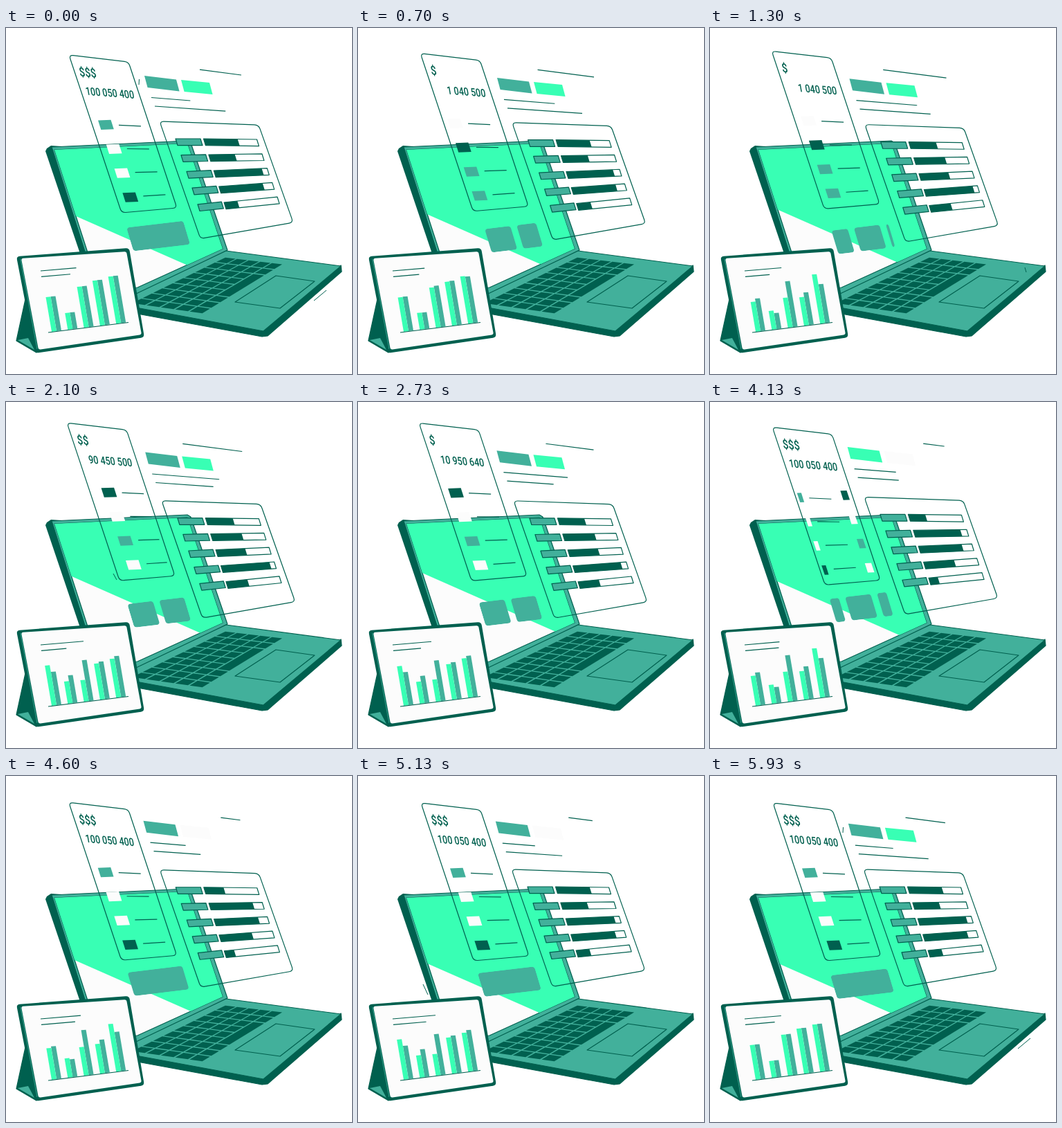
An HTML page that plays this animation: 500 px wide and 500 px high, repeating every 6010 ms.

```html
<!DOCTYPE html>
<html lang="en">
<head>
<meta charset="utf-8">
<title>Laptop dashboard</title>
<style>
  html, body { margin: 0; width: 100%; height: 100%; overflow: hidden; background: #fff; }
  svg { display: block; width: 100vw; height: 100vh; }
  text { font-family: Roboto, "Liberation Sans", sans-serif; font-weight: 500; fill: #00604f; }
</style>
</head>
<body>
<svg id="stage" viewBox="0 0 500 500"></svg>
<script>
const DARK = '#00604f', TEAL = '#42b09b', GREEN = '#38ffb4', WHITE = '#fcfcfc';
const LOOP = 6010;
const stage = document.getElementById('stage');

function set(node, attrs) {
  for (const name in attrs) node.setAttribute(name, attrs[name]);
  return node;
}
function add(parent, tag, attrs = {}) {
  return parent.appendChild(set(document.createElementNS('http://www.w3.org/2000/svg', tag), attrs));
}
const group = (parent, attrs) => add(parent, 'g', attrs);
const poly = (parent, points, fill, attrs = {}) => add(parent, 'polygon', { points, fill, ...attrs });
const line = (parent, x1, y1, x2, y2, width = 1.2) =>
  add(parent, 'line', { x1, y1, x2, y2, stroke: DARK, 'stroke-width': width });
const move = (node, x, y) => node.setAttribute('transform', `translate(${x} ${y})`);
const outline = { stroke: DARK, 'stroke-width': 1.2, 'stroke-linejoin': 'round' };

function setLength(node, length, slope) {
  set(node, { x2: +node.getAttribute('x1') + length, y2: +node.getAttribute('y1') + length * slope });
}

function roundPoly(parent, points, r, attrs) {
  const n = points.length;
  const toward = (a, b) => {
    const k = r / Math.hypot(b[0] - a[0], b[1] - a[1]);
    return [a[0] + (b[0] - a[0]) * k, a[1] + (b[1] - a[1]) * k];
  };
  const d = points.map((p, i) =>
    `${i ? 'L' : 'M'}${toward(p, points[(i + n - 1) % n])}Q${p} ${toward(p, points[(i + 1) % n])}`);
  return add(parent, 'path', { d: d.join('') + 'Z', ...attrs });
}

function clip(id, tag, attrs) {
  add(add(stage, 'clipPath', { id }), tag, attrs);
  return `url(#${id})`;
}

// Timing
const STEP = 600;
const wave = (t, delay = 0, period = LOOP) => Math.sin(2 * Math.PI * (t - delay) / period);
// One rise and fall; skew below 1 brings the peak forward.
const swell = (t, span, skew) => Math.sin(Math.PI * Math.min(1, t / span) ** skew) ** 2;
const progress = (t, start) => Math.min(1, Math.max(0, (t - start) / STEP));
const smooth = x => x * x * (3 - 2 * x);
const backOut = x => 1 + 2.7 * (x - 1) ** 3 + 1.7 * (x - 1) ** 2;
const countPassed = (t, starts) => starts.filter(s => s <= t).length;
// Holds each pose and eases to the next one at every start.
const blend = (t, starts, poses) =>
  starts.reduce((v, s, i) => v + (poses[i + 1] - poses[i]) * smooth(progress(t, s)), poses[0]);

// Laptop
const laptop = group(stage);
poly(laptop, '57,178 59,174 65,170 80,171 150,388 128,388', DARK);
poly(laptop, '66,172 262,163 267,166 320,321 190,386 134,386', TEAL, outline);
const SCREEN = '70,176 262,167 313,319 190,375 136,380';
poly(laptop, SCREEN, WHITE, outline);
const screen = group(laptop, { 'clip-path': clip('screen', 'polygon', { points: SCREEN }) });
const wash = poly(screen, '', GREEN);
poly(laptop, '190,404 372,438 484,343 485,352 378,445 370,446 190,413', DARK, outline);
poly(laptop, '188,384 318,322 484,344 372,438 188,404', TEAL, outline);
poly(laptop, '390,358 446,366 396,405 331,396', 'none', outline);

// Keyboard: u runs along the hinge, v from the hinge to the front.
function keyPoint(u, v) {
  const mix = (a, b, c, d) => (a * (1 - u) + d * u) * (1 - v) + (b * (1 - u) + c * u) * v;
  return [mix(317, 401, 284, 180), mix(331, 341, 413, 398)];
}
const KEY_ROWS = 5, KEY_COLS = 9;
function addKey(col, row, span = 1) {
  const u0 = (col + 0.07) / KEY_COLS, u1 = (col + span - 0.07) / KEY_COLS;
  const v0 = (row + 0.06) / KEY_ROWS, v1 = (row + 0.94) / KEY_ROWS;
  return poly(laptop, [keyPoint(u0, v0), keyPoint(u0, v1), keyPoint(u1, v1), keyPoint(u1, v0)].join(' '), DARK);
}
for (let row = 0; row < KEY_ROWS; row++)
  for (let col = 0; col < KEY_COLS; col++)
    if (row < KEY_ROWS - 1 || col < 2 || col > 5) addKey(col, row);
const spaceBar = addKey(2, KEY_ROWS - 1, 4);

// Header pills, text lines and the tiles on the screen float together.
const header = group(stage);
const pillA = add(header, 'rect', { width: 46, height: 17, transform: 'matrix(1 .12 .27 1 200 69)' });
const pillB = add(header, 'rect', { width: 41, height: 17, transform: 'matrix(1 .1 .27 1 253 75)' });
const titleLine = line(header, 340, 68, 0, 0);
const textA = line(header, 210, 100.5, 0, 0);
const textB = line(header, 215, 113, 0, 0);
const tiles = group(group(header, { transform: 'matrix(1 -.12 .3 1 174 288.5)' }),
  { 'clip-path': clip('tiles', 'rect', { width: 82, height: 34, rx: 4 }) });
const wide = [[0, 82]], pair = [[0, 37], [46, 36]];
const tileSets = [wide, pair, pair, wide].map(spans => {
  const g = group(tiles);
  for (const [x, width] of spans) add(g, 'rect', { x, width, height: 34, rx: 4, fill: TEAL });
  return g;
});
const TILE_STARTS = [300, 1250, 4097];

// Amount card
const amountCard = group(stage);
roundPoly(amountCard, [[91, 39], [177, 49], [247, 260], [167, 267]], 6, { fill: 'none', ...outline });
const dollars = add(amountCard, 'text', { 'font-size': 18, transform: 'matrix(.8 .07 .2 1 107 69.5)' });
const amount = add(amountCard, 'text',
  { 'font-size': 16, 'text-anchor': 'end', transform: 'matrix(.78 .06 .18 1 186 102)' });
const rows = group(amountCard,
  { 'clip-path': clip('rows', 'polygon', { points: '115,100 188,100 249,280 176,280' }) });
const rowSets = [
  [TEAL, WHITE, WHITE, DARK], [WHITE, DARK, TEAL, TEAL],
  [DARK, WHITE, TEAL, WHITE], [TEAL, WHITE, WHITE, DARK]
].map(colors => {
  const g = group(rows);
  colors.forEach((fill, i) => {
    const x = 133 + 11.8 * i, y = 133.5 + 34.9 * i;
    add(g, 'rect', { width: 18.5, height: 13.5, fill, transform: `matrix(1 -.04 .32 1 ${x} ${y})` });
    line(g, x + 30, y + 6.8 - i * 0.7, x + 62, y + 8.3 - i * 1.9);
  });
  return g;
});
const ROW_STARTS = [500, 1750, 4000];
const AMOUNTS = [['$$$', '100 050 400'], ['$', '1 040 500'], ['$$', '90 450 500'],
  ['$', '10 950 640'], ['$$$', '100 050 400']];
const AMOUNT_STARTS = [500, 1750, 2700, 4000];

// Progress card
const progressCard = group(stage);
roundPoly(progressCard, [[222, 135], [365, 140], [415, 281], [281, 304.5]], 6, { fill: 'none', ...outline });
function slab(x, y, dx, dy) {
  return `${x},${y} ${x + dx},${y + dy} ${x + dx + 3},${y + dy + 9.7} ${x + 3},${y + 9.7}`;
}
const barSlab = (i, part) => slab(285.5 + 7.4 * i, 160 + 23 * i, 77 * part, (1 - 2.2 * i) * part);
const LEVEL_STARTS = [600, 2650, 4450];
const levels = [[.64, .51, .32], [.49, .58, .88], [.9, .55, .81], [.82, .91, .57], [.25, .4, .17]]
  .map((poses, i) => {
    poly(progressCard, slab(245 + 8 * i, 160 + 23.7 * i, 36 - 0.4 * i, -0.9 * i), TEAL, outline);
    poly(progressCard, barSlab(i, 1), '#fff', outline);
    return { poses: [...poses, poses[0]], node: poly(progressCard, barSlab(i, 1), DARK) };
  });

// Tablet
const tablet = group(stage);
poly(tablet, '28,392 15,452 44,469 50,460', DARK, outline);
poly(tablet, '17,451 32,448 41,465', TEAL);
roundPoly(tablet, [[15, 330], [178, 318], [200, 447], [42, 470]], 5, { fill: DARK });
roundPoly(tablet, [[22, 333], [174, 323], [196, 443], [47, 465]], 3, { fill: WHITE });
line(tablet, 21, 334, 45, 464, 0.8).setAttribute('stroke', TEAL);
const noteA = line(tablet, 50, 351, 0, 0);
const noteB = line(tablet, 51, 359.3, 0, 0);

// Bar heights: two level poses, and two where front and back bars part.
const HIGH = [50, 24, 59, 65, 68], LOW = [37, 23, 49, 33, 68];
const MIXED = { front: [43, 27, 43, 41, 71], back: [47, 23, 66, 47, 56] };
const EVEN = { front: [58, 32, 31, 52, 56], back: [48, 40, 59, 54, 59] };
const CHART_STARTS = [600, 1450, 2650, 3450, 4450, 5300];
const chart = HIGH.flatMap((high, i) => ['back', 'front'].map(side => {
  const mixed = MIXED[side][i], even = EVEN[side][i], isBack = side === 'back';
  return {
    x: 66 + 23.3 * i + (isBack ? 7 : 0),
    poses: [high, mixed, even, LOW[i], mixed, even, high],
    node: poly(tablet, '', isBack ? TEAL : GREEN)
  };
}));
line(tablet, 61, 440, 177, 425.5);

// Short strokes that flash by: moment, start point, extent.
const glints = [
  [5990, 445, 394, 18, -15], [5990, 192.5, 74, -0.5, 8], [1300, 455, 346, 2, 7],
  [2100, 155, 248, 5, 9], [3330, 460, 348, 3, 7], [5130, 94, 301, 7, 15]
].map(([moment, x, y, dx, dy]) => ({ moment, node: line(stage, x, y, x + dx, y + dy, 1) }));

function carousel(sets, t, starts, gap, tilt) {
  const index = countPassed(t, starts);
  const p = index ? backOut(progress(t, starts[index - 1])) : 1;
  sets.forEach((node, i) => {
    const x = gap * (p - 1 + index - i);
    node.style.display = i === index || i === index - 1 ? '' : 'none';
    move(node, x, x * tilt);
  });
}

function draw(t) {
  const sway = wave(t), rise = swell(t, 5130, 0.9), sink = swell(t, 5130, 0.95);
  move(header, 1.5 * sway, 4.3 * sway);
  move(amountCard, -3 * rise, -9 * rise);
  move(progressCard, 3 * sink, 8 * sink);

  const edge = 272 - 25 * swell(t, 5400, 1.1);
  const edgeAt = x => edge + (x - 70 - (edge - 176) * 0.325) * 0.44;
  set(wash, { points: `60,160 330,160 330,${edgeAt(330)} 60,${edgeAt(60)}` });

  const swapped = t > 3960;
  set(pillA, { fill: swapped && t < 4600 ? GREEN : TEAL });
  set(pillB, { fill: swapped && t < 5500 ? WHITE : GREEN });
  setLength(titleLine, -60 - 32 * sway, 0.13);
  setLength(textA, 72 + 25 * wave(t, 650), 0.08);
  setLength(textB, 82 + 26 * wave(t, 650 - LOOP / 4), 0.07);
  carousel(tileSets, t, TILE_STARTS, 91, 0);
  carousel(rowSets, t, ROW_STARTS, 75, -0.05);

  [dollars.textContent, amount.textContent] = AMOUNTS[countPassed(t, AMOUNT_STARTS)];

  levels.forEach(({ poses, node }, i) => set(node, { points: barSlab(i, blend(t, LEVEL_STARTS, poses)) }));
  for (const { x, poses, node } of chart) {
    const base = 439.5 - (x - 61) * 0.125, height = blend(t, CHART_STARTS, poses);
    const y = base - height, lean = height * 0.17;
    set(node, { points: `${x},${base} ${x - lean},${y} ${x + 7 - lean},${y - 0.6} ${x + 7},${base - 0.9}` });
  }
  setLength(noteA, 54 + 8 * wave(t, 1350, LOOP / 2), -0.085);
  setLength(noteB, 42 - 7 * sway, -0.085);

  set(spaceBar, { fill: t > 3200 && t < 3500 ? '#39d6a4' : DARK });
  for (const { moment, node } of glints) {
    const away = Math.abs(t - moment);
    node.style.display = Math.min(away, LOOP - away) < 120 ? '' : 'none';
  }
}

const start = performance.now();
function tick() {
  draw((performance.now() - start) % LOOP);
  requestAnimationFrame(tick);
}
tick();
</script>
</body>
</html>
```
